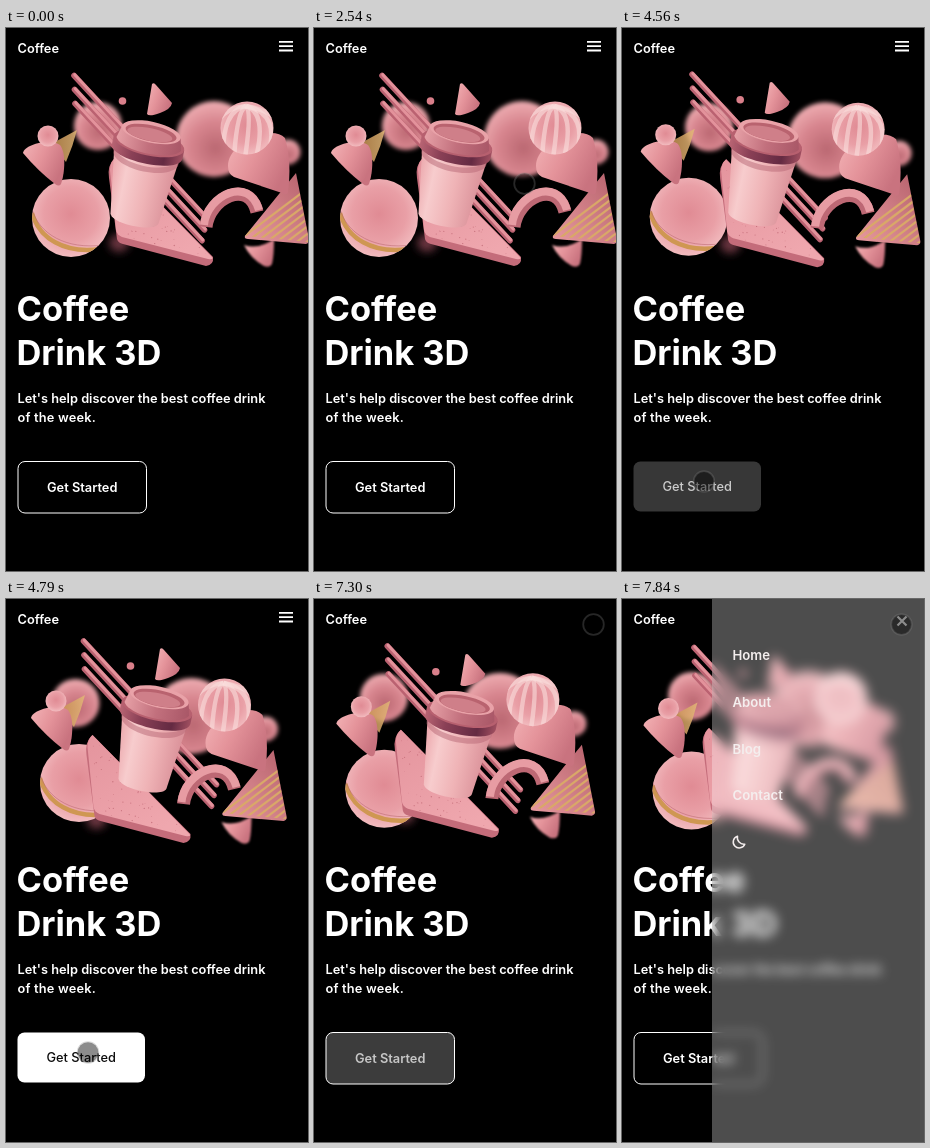
An HTML page that plays this animation: 302 px wide and 543 px high, repeating every 8 s.

```html
<!DOCTYPE html>
<html lang="en">
<head>
<meta charset="utf-8">
<title>Coffee Drink 3D</title>
<style>
html, body { margin: 0; width: 100%; height: 100%; overflow: hidden; background: #000; }
#stage { position: relative; width: 302px; height: 543px; overflow: hidden; background: #000; }
svg { position: absolute; left: 0; top: 0; display: block; }
text { font-family: Inter, Roboto, sans-serif; font-weight: 600; font-size: 12.8px; fill: #fff; }
.title { font-weight: 700; font-size: 34.4px; }
#menu { position: absolute; left: 0; top: 0; width: 212px; height: 543px; background: rgba(255,255,255,.3);
  -webkit-backdrop-filter: blur(6px); backdrop-filter: blur(6px); }
#menu text { fill: #f4eeee; font-size: 13.2px; }
</style>
</head>
<body>
<div id="stage">
<svg width="302" height="543" viewBox="0 0 302 543">
  <defs>
    <radialGradient id="ball" cx=".5" cy=".45" r=".58">
      <stop offset="0" stop-color="#e08b94"/><stop offset=".6" stop-color="#e99fa6"/><stop offset="1" stop-color="#f3bfc2"/>
    </radialGradient>
    <radialGradient id="dim" cx=".52" cy=".62" r=".7">
      <stop offset="0" stop-color="#bb6872"/><stop offset=".5" stop-color="#d8868f"/><stop offset="1" stop-color="#f4b9bc"/>
    </radialGradient>
    <linearGradient id="cone" x1="0" y1="0" x2="1" y2=".5">
      <stop offset="0" stop-color="#f3b3b6"/><stop offset=".5" stop-color="#e4939a"/><stop offset="1" stop-color="#c9737f"/>
    </linearGradient>
    <linearGradient id="body">
      <stop offset="0" stop-color="#eba6ab"/><stop offset=".25" stop-color="#f7cccd"/><stop offset=".6" stop-color="#efb3b6"/><stop offset="1" stop-color="#da9199"/>
    </linearGradient>
    <linearGradient id="rim">
      <stop offset="0" stop-color="#b86473"/><stop offset=".3" stop-color="#8a4056"/><stop offset=".75" stop-color="#642a42"/><stop offset="1" stop-color="#a04f60"/>
    </linearGradient>
    <linearGradient id="collar">
      <stop offset="0" stop-color="#e6a0a6"/><stop offset=".5" stop-color="#c2707d"/><stop offset="1" stop-color="#a95767"/>
    </linearGradient>
    <linearGradient id="slab" x1="0" y1="0" x2=".6" y2="1">
      <stop offset="0" stop-color="#e4949d"/><stop offset="1" stop-color="#efa7ae"/>
    </linearGradient>
    <linearGradient id="gold"><stop offset="0" stop-color="#c58d4e"/><stop offset="1" stop-color="#e3b878"/></linearGradient>
    <linearGradient id="wedge" x1="0" y1="1" x2="1" y2="0">
      <stop offset="0" stop-color="#e89a9f"/><stop offset="1" stop-color="#b5606b"/>
    </linearGradient>
    <filter id="soft" x="-30%" y="-30%" width="160%" height="160%"><feGaussianBlur stdDeviation="2"/></filter>
    <filter id="haze" x="-60%" y="-60%" width="220%" height="220%"><feGaussianBlur stdDeviation="4"/></filter>
    <filter id="faint"><feGaussianBlur stdDeviation=".8"/></filter>
    <clipPath id="swirlClip"><circle cx="241" cy="100" r="26.5"/></clipPath>
    <clipPath id="wedgeClip"><path d="M290 145L239 208 303 214Z"/></clipPath>
    <clipPath id="slabClip"><path d="M109 132L204 230 112 207Z"/></clipPath>
    <clipPath id="globeClip"><circle cx="65" cy="190" r="39"/></clipPath>
  </defs>

  <g class="far">
    <circle cx="92" cy="98" r="24" fill="url(#dim)" filter="url(#soft)"/>
    <circle cx="208" cy="111" r="38" fill="url(#dim)" filter="url(#soft)"/>
    <circle cx="282" cy="124" r="12.5" fill="url(#dim)" filter="url(#soft)"/>
    <ellipse cx="113" cy="215" rx="10" ry="9" fill="#6b3540" filter="url(#haze)"/>
  </g>
  <g class="mid" id="sticks"></g>
  <g class="near">
    <circle cx="65" cy="190" r="39" fill="url(#ball)"/>
    <path d="M26 185C33 210 58 226 94 221" fill="none" stroke="#cf9752" stroke-width="4.500" clip-path="url(#globeClip)"/>
    <path d="M26 181C33 206 60 222 98 217" fill="none" stroke="#b5606b" stroke-opacity=".5" clip-path="url(#globeClip)"/>
    <path d="M45 116L71 102Q67 118 60 134Z" fill="url(#gold)" fill-opacity=".85"/>
    <path d="M17 125C18 116 46 110 54 117C61 126 58 148 55 156Q53 159 49 156Q32 143 17 125Z" fill="url(#cone)"/>
    <circle cx="42" cy="108" r="10.5" fill="url(#ball)"/>
  </g>
  <g class="far">
    <path d="M109 130Q101 137 103 150L111 211Q112 215 117 216L200 238Q208 237 207 229Z" fill="#c46c7a"/>
    <path d="M109 130L206 229Q208 232 202 231L116 209Q111 207 110 202L104 142Q104 134 109 130Z" fill="url(#slab)"/>
    <g id="crumbs" clip-path="url(#slabClip)" fill="#c9747f"></g>
    <path d="M200 199C203 170 243 150 251 184" fill="none" stroke="#bd6874" stroke-width="13"/>
    <path d="M198 197C201 167 243 147 253 182" fill="none" stroke="#e79ca3" stroke-width="8"/>
    <path d="M238 217Q252 222 268 211Q268 228 266 236Q264 240 258 238Q244 230 238 217Z" fill="url(#cone)" filter="url(#faint)"/>
    <path d="M290 145L239 208Q238 211 242 211L300 216Q304 215 303 211Z" fill="url(#wedge)"/>
    <g id="stripes" clip-path="url(#wedgeClip)" stroke="#d9a868" stroke-width="2.200"></g>
    <path d="M222 138C222 114 266 96 279 110Q286 134 282 164Q281 168 276 165L228 149Q222 146 222 138Z" fill="url(#cone)"/>
    <circle cx="241" cy="100" r="26.5" fill="url(#ball)"/>
    <g id="swirl" clip-path="url(#swirlClip)" fill="none" stroke="#fbdedd" stroke-opacity=".6" stroke-width="4.500"></g>
  </g>
  <g class="near">
    <path d="M146 56Q148 54 150 57L166 75Q165 81 154 85Q143 89 141 86Z" fill="url(#cone)"/>
    <circle cx="116.500" cy="73" r="3.8" fill="#d97f8a"/>
    <g transform="translate(143 115) rotate(12)">
      <path d="M-33 12L-23 77C-20 87 23 87 26 77L33 12Z" fill="url(#body)"/>
      <path d="M-34 10C-26 28 26 28 34 10L33 17C25 33 -25 33 -33 17Z" fill="#b86876" fill-opacity=".5"/>
      <path d="M-36 0V9C-34 25 34 25 36 9V0Z" fill="url(#rim)"/>
      <ellipse rx="36" ry="12.500" fill="#b7606f"/>
      <path d="M-30 -11L-33 1C-26 14 26 14 33 1L30 -11Z" fill="url(#collar)"/>
      <ellipse cy="-11" rx="30" ry="10.500" fill="#e9a2a8"/>
      <ellipse cy="-10" rx="26" ry="8" fill="#b9636f"/>
      <ellipse cx="-1" cy="-8.500" rx="23" ry="6.300" fill="#cf7f89"/>
    </g>
  </g>

  <text x="11.500" y="25">Coffee</text>
  <path id="bars" fill="#fff" d="M273 13h14v1.800h-14zM273 17.300h14v1.800h-14zM273 21.600h14v1.800h-14z"/>
  <text class="title" x="10.500" y="292.500">Coffee</text>
  <text class="title" x="10.500" y="336.500">Drink 3D</text>
  <text x="11.500" y="375">Let's help discover the best coffee drink</text>
  <text x="11.500" y="394" letter-spacing=".2">of the week.</text>
  <rect id="btn" rx="7"/>
  <text id="label" text-anchor="middle">Get Started</text>
</svg>

<div id="menu">
  <svg width="212" height="543" viewBox="0 0 212 543">
    <text x="20.500" y="61">Home</text>
    <text x="20.500" y="108">About</text>
    <text x="20.500" y="155">Blog</text>
    <text x="20.500" y="201">Contact</text>
    <path d="M25.500 237.200A6 6 0 1 0 32.800 245.200A6.600 6.600 0 0 1 25.500 237.200Z" fill="none" stroke="#f4eeee" stroke-width="1.500" stroke-linejoin="round"/>
  </svg>
</div>

<svg width="302" height="543" viewBox="0 0 302 543">
  <path id="close" d="M275.500 17.500l9 9m0-9l-9 9" stroke="#fff" stroke-width="2.200"/>
  <circle id="touch" r="10.300" stroke="rgb(128,128,128)" stroke-width="1.800" stroke-opacity=".3"/>
</svg>
</div>

<script>
const LOOP = 8000;
const $ = id => document.getElementById(id);
const clamp = v => Math.max(0, Math.min(1, v));
const mix = (a, b, k) => a + (b - a) * k;

function add(parent, tag, attrs) {
  const el = document.createElementNS('http://www.w3.org/2000/svg', tag);
  for (const k in attrs) el.setAttribute(k, attrs[k]);
  $(parent).appendChild(el);
}

function buildArt() {
  for (let i = 0; i < 3; i++) {
    const x = 68 + i * .5, y = 47.5 + i * 14, dx = 133 - i * 3;
    const line = (o, c, w) => add('sticks', 'path', {
      d: `M${x + o} ${y - o}l${dx} ${dx * 1.08}`, stroke: c, 'stroke-width': w, 'stroke-linecap': 'round'
    });
    line(0, '#bb6271', 5.6);
    line(.8, '#e3929b', 3);
  }
  let seed = 7;
  const rnd = () => (seed = seed * 16807 % 2147483647) / 2147483647;
  for (let i = 0; i < 150; i++)
    add('crumbs', 'circle', { cx: 105 + rnd() * 100, cy: 132 + rnd() * 98, r: .3 + rnd() * .4 });
  for (let i = 0; i < 10; i++)
    add('stripes', 'path', { d: `M${220 + i * 10} 222l90 -68` });
  for (let i = -3; i <= 3; i++)
    add('swirl', 'path', { d: `M240 78Q${246 + i * 15} ${84 + i} ${239 + i * 11} 130` });
}

// CSS "ease" timing curve
function ease(x) {
  x = clamp(x);
  let lo = 0, hi = 1, s = x;
  const bez = (a, b, u) => 3 * a * u * (1 - u) ** 2 + 3 * b * u * u * (1 - u) + u ** 3;
  for (let i = 0; i < 18; i++) {
    s = (lo + hi) / 2;
    if (bez(.25, .25, s) < x) lo = s; else hi = s;
  }
  return bez(.1, 1, s);
}

// Touch pointer: time, x, y
const path = [
  [210, 212, 472], [290, 291, 158], [370, 318, 90],
  [1600, 220, 134], [1640, 220, 134], [1850, 170, 72], [2010, 148, 92], [2190, 152, 148], [2390, 169, 184],
  [2450, 169, 184], [2700, 283, 106],
  [2950, 283, 106], [3010, 292, 60], [3160, 222, 250], [3320, 150, 391],
  [3520, 150, 391], [3870, 94, 444], [4180, 82, 453.5],
  [5400, 82, 453.5], [5800, 165, 260], [6220, 272, 33], [6290, 274, 29], [6690, 279.5, 25.5]
];
function pointAt(t) {
  let i = 0;
  while (i < path.length - 2 && t >= path[i + 1][0]) i++;
  const [a, b] = [path[i], path[i + 1]];
  const k = clamp((t - a[0]) / (b[0] - a[0]));
  return [mix(a[1], b[1], k), mix(a[2], b[2], k)];
}

// Parallax shift of each layer after the first and second tap
const layers = {
  far: [[-22.5, 6], [-22, -1]],
  mid: [[9.5, -5.5], [4, 1]],
  near: [[8, -6], [4.5, 1.5]]
};

function draw(t) {
  const tap1 = ease((t - 4520) / 250), tap2 = ease((t - 7180) / 260);
  for (const name in layers) {
    const [p, q] = layers[name];
    const [x, y] = [0, 1].map(i => mix(p[i] * tap1, q[i], tap2));
    document.querySelectorAll('.' + name).forEach(g => g.setAttribute('transform', `translate(${x} ${y})`));
  }

  const hover = t >= 4540 && t < 7200;
  const fill = tap1 * (1 - tap2);
  const box = hover ? { x: 11.5, y: 433.5, width: 127.5, height: 50 } : { x: 12, y: 433.5, width: 128.5, height: 51.5 };
  for (const k in box) $('btn').setAttribute(k, box[k]);
  $('btn').setAttribute('fill', `rgba(255,255,255,${fill})`);
  $('btn').setAttribute('stroke', hover ? 'none' : '#fff');
  const shade = Math.round(mix(255, 12, fill));
  $('label').style.fill = `rgb(${shade},${shade},${shade})`;
  $('label').style.fontWeight = hover ? 500 : 600;
  $('label').setAttribute('x', hover ? 75.2 : 76.2);
  $('label').setAttribute('y', hover ? 463 : 464);

  const open = ease((t - 7340) / 500);
  $('menu').style.visibility = open > 0 ? 'visible' : 'hidden';
  $('menu').style.transform = `translateX(${mix(302, 90, open)}px)`;
  $('bars').style.visibility = t < 7230 ? 'visible' : 'hidden';
  $('close').style.opacity = clamp((t - 7560) / 220);

  const shown = (t >= 210 && t < 370) || t >= 1620;
  const down = (t >= 4410 && t < 4560) || (t >= 7070 && t < 7220);
  const [x, y] = pointAt(t);
  const touch = $('touch');
  touch.style.visibility = shown ? 'visible' : 'hidden';
  touch.setAttribute('cx', x);
  touch.setAttribute('cy', y);
  touch.setAttribute('fill', `rgba(0,0,0,${down ? .55 : .45})`);
}

buildArt();
const start = performance.now();
function tick() {
  draw((performance.now() - start) % LOOP);
  requestAnimationFrame(tick);
}
draw(0);
requestAnimationFrame(tick);
</script>
</body>
</html>
```
